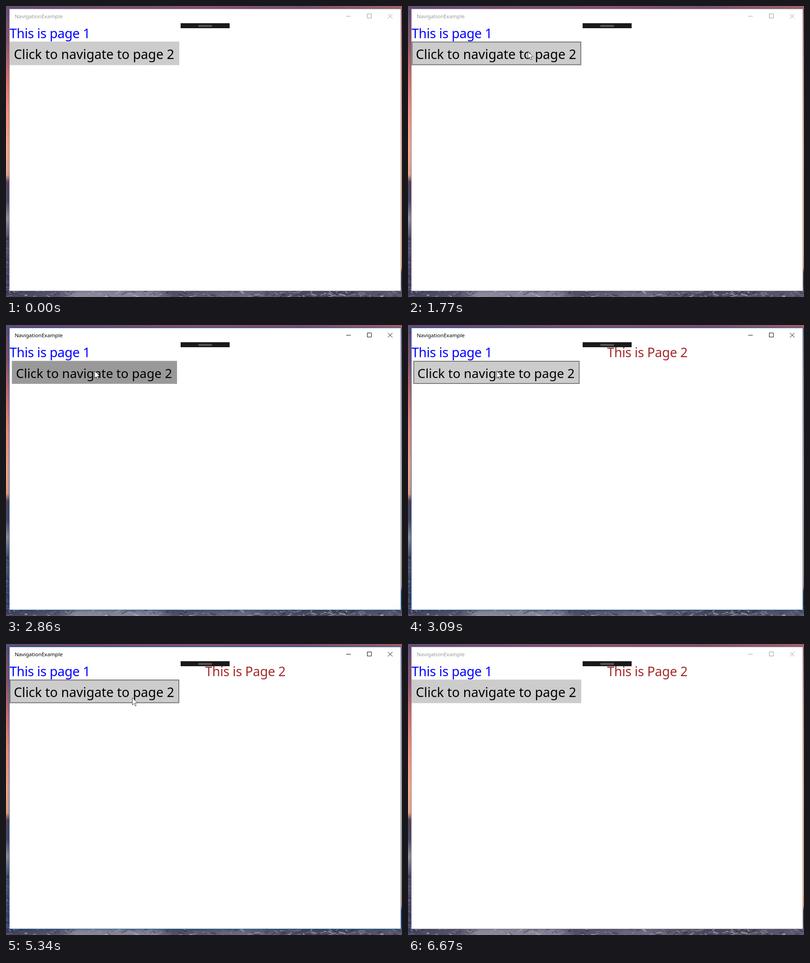
These frames come from a looping animation (873 px wide and 642 px high, 6.76 s). An HTML page with a canvas:

```html
<!DOCTYPE html>
<html lang="en">
<head>
<meta charset="utf-8">
<title>NavigationExample</title>
<style>
html, body { margin: 0; width: 100%; height: 100%; overflow: hidden; }
canvas { display: block; }
</style>
</head>
<body>
<canvas id="stage" width="873" height="642"></canvas>
<script>
const W = 873, H = 642, LOOP = 6760;
const START = 840, STEP = 77.5; // the screen refreshes on this grid
const stage = document.getElementById('stage');
const ctx = stage.getContext('2d');

// Pointer tip as [step, x, y]; a missing x hides the pointer.
const PATH = [
  [0, 759, 629], [1, 590, 440], [2, 400, 262], [3, 236, 128], [4, 167, 96], [8, 150, 91],
  [12, 264, 100], [17, 124, 103], [18, 124, 103], [19, 165, 102], [20, 195, 101],
  [57, 195, 101], [58, 278, 118], [62, 555, 302], [66, 792, 526],
  [67, 804, 550], [70, 846, 632], [71]
];

function pointerAt(n) {
  const i = PATH.findIndex(p => p[0] > n);
  if (i < 1) return null;
  const [n0, x0, y0] = PATH[i - 1], [n1, x1 = x0, y1 = y0] = PATH[i];
  const k = (n - n0) / (n1 - n0);
  return [x0 + (x1 - x0) * k, y0 + (y1 - y0) * k];
}

function buttonScale(n) {
  if (n === 25) return 0.99;
  if (n >= 26 && n < 29) return 0.9735;
  return n >= 29 && n < 32 ? 0.9735 + 0.0265 * (n - 28) / 4 : 1;
}

function makeWallpaper() {
  const layer = document.createElement('canvas');
  layer.width = W;
  layer.height = H;
  const g = layer.getContext('2d');
  let seed = 7;
  const rand = () => (seed = seed * 16807 % 2147483647) / 2147483647;
  const strip = (x, y, w, h, stops) => {
    const fill = w > h ? g.createLinearGradient(x, 0, x + w, 0) : g.createLinearGradient(0, y, 0, y + h);
    stops.forEach(([at, color]) => fill.addColorStop(at, color));
    g.fillStyle = fill;
    g.fillRect(x, y, w, h);
  };
  const streaks = (count, x, y, w, h, tones) => {
    for (let i = 0; i < count; i++) {
      const sx = x + rand() * w, sy = y + rand() * h;
      g.strokeStyle = tones[Math.floor(rand() * tones.length)];
      g.lineWidth = .6 + rand() * 2;
      g.beginPath();
      g.moveTo(sx, sy);
      g.lineTo(sx + 3 + rand() * 13, sy + rand() * 14 - 7);
      g.stroke();
    }
  };
  strip(0, 0, 20, H, [[0, '#655078'], [.12, '#8c5874'], [.25, '#d87472'], [.36, '#fa9080'], [.5, '#f6ac8e'],
    [.58, '#e8a48c'], [.605, '#5a4660'], [.67, '#504a68'], [.73, '#94919f'], [.79, '#5b5874'], [1, '#3c3b60']]);
  strip(860, 0, 13, H, [[0, '#a5646e'], [.2, '#dc9080'], [.5, '#f6b890'], [.86, '#f4aa78'], [.9, '#e89c6c'],
    [.915, '#4a475e'], [1, '#3f3e56']]);
  strip(0, 0, W, 20, [[0, '#655078'], [.25, '#7c4e70'], [.5, '#8c5474'], [.75, '#825270'], [1, '#a5646e']]);
  strip(0, 620, W, 22, [[0, '#43425f'], [.13, '#56556e'], [.18, '#8b8a9b'], [.37, '#84839a'], [.42, '#514f66'],
    [.6, '#6d6c82'], [.75, '#4a495f'], [1, '#5c5b72']]);
  g.globalAlpha = .6;
  streaks(60, -8, 500, 12, 140, ['#34335a', '#4a4868', '#6c6a84']);
  streaks(260, 0, 624, W, 20, ['#2a293b', '#3a394e', '#7c7b90', '#a3a2b1', '#cfced8']);
  return layer;
}
const wallpaper = makeWallpaper();

function rect(x, y, w, h, color) {
  ctx.fillStyle = color;
  ctx.fillRect(x, y, w, h);
}

function text(str, x, y, color, size = 28.6, spacing = 0) {
  ctx.font = `${size}px "Noto Sans", "Open Sans", sans-serif`;
  ctx.letterSpacing = `${spacing}px`;
  ctx.fillStyle = color;
  ctx.fillText(str, x, y);
}

const heading = (str, x, color) => text(str, x, 71, color, 28.6, -.3);

function drawWindow(active) {
  const ink = active ? '#000' : '#999';
  ctx.save();
  ctx.shadowColor = active ? 'rgba(0,0,0,.3)' : 'rgba(0,0,0,.18)';
  ctx.shadowBlur = active ? 10 : 6;
  ctx.shadowOffsetY = 1;
  rect(7, 6, 864, 623, active ? '#1874bd' : '#958f9b');
  ctx.restore();
  rect(8, 7, 862, 621, '#fff');
  text('NavigationExample', 19.2, 27, ink, 11.6);

  ctx.strokeStyle = ink;
  ctx.lineWidth = 1;
  ctx.beginPath();
  ctx.moveTo(750, 22.5);
  ctx.lineTo(760, 22.5);
  ctx.rect(796.5, 17.5, 9, 9);
  ctx.moveTo(842, 17.5);
  ctx.lineTo(852, 27.5);
  ctx.moveTo(852, 17.5);
  ctx.lineTo(842, 27.5);
  ctx.stroke();
}

function drawButton(n) {
  const pressed = n >= 25 && n < 29;
  const hover = n >= 3 && n < 59 && !pressed;
  const scale = buttonScale(n);
  ctx.save();
  ctx.translate(195, 104.5);
  ctx.scale(scale, scale);
  ctx.translate(-195, -104.5);
  rect(8, 78.5, 374, 52, pressed ? '#999' : '#ccc');
  if (hover) {
    ctx.strokeStyle = '#7a7a7a';
    ctx.lineWidth = 2;
    ctx.strokeRect(9, 79.5, 372, 50);
  }
  text('Click to navigate to page 2', 17.2, 117, '#000');
  ctx.restore();
}

function drawPointer(x, y) {
  ctx.save();
  ctx.translate(Math.round(x) + .5, Math.round(y) + .5);
  ctx.beginPath();
  [[0, 0], [0, 16], [3.6, 12.6], [6.2, 18.4], [8.6, 17.4], [6.1, 11.6], [11.2, 11.4]]
    .forEach(p => ctx.lineTo(...p));
  ctx.closePath();
  ctx.fillStyle = '#fff';
  ctx.fill();
  ctx.strokeStyle = '#333';
  ctx.lineWidth = .9;
  ctx.stroke();
  ctx.restore();
}

function draw(t) {
  const n = Math.floor((t + 1 - START) / STEP);
  ctx.drawImage(wallpaper, 0, 0);
  drawWindow(n >= 25 && n < 75);
  heading('This is page 1', 8, '#00f');
  if (n >= 27) heading('This is Page 2', 439, '#a52a2a');
  drawButton(n);
  rect(385, 38, 108, 11, '#1a1a1a');
  rect(424, 42, 30, 1, '#666');
  rect(424, 43, 30, 2, '#484848');
  rect(424, 45, 30, 1, '#666');
  const tip = pointerAt(n);
  if (tip) drawPointer(...tip);
}

const begin = performance.now();
function tick() {
  draw((performance.now() - begin) % LOOP);
  requestAnimationFrame(tick);
}
tick();
</script>
</body>
</html>
```
